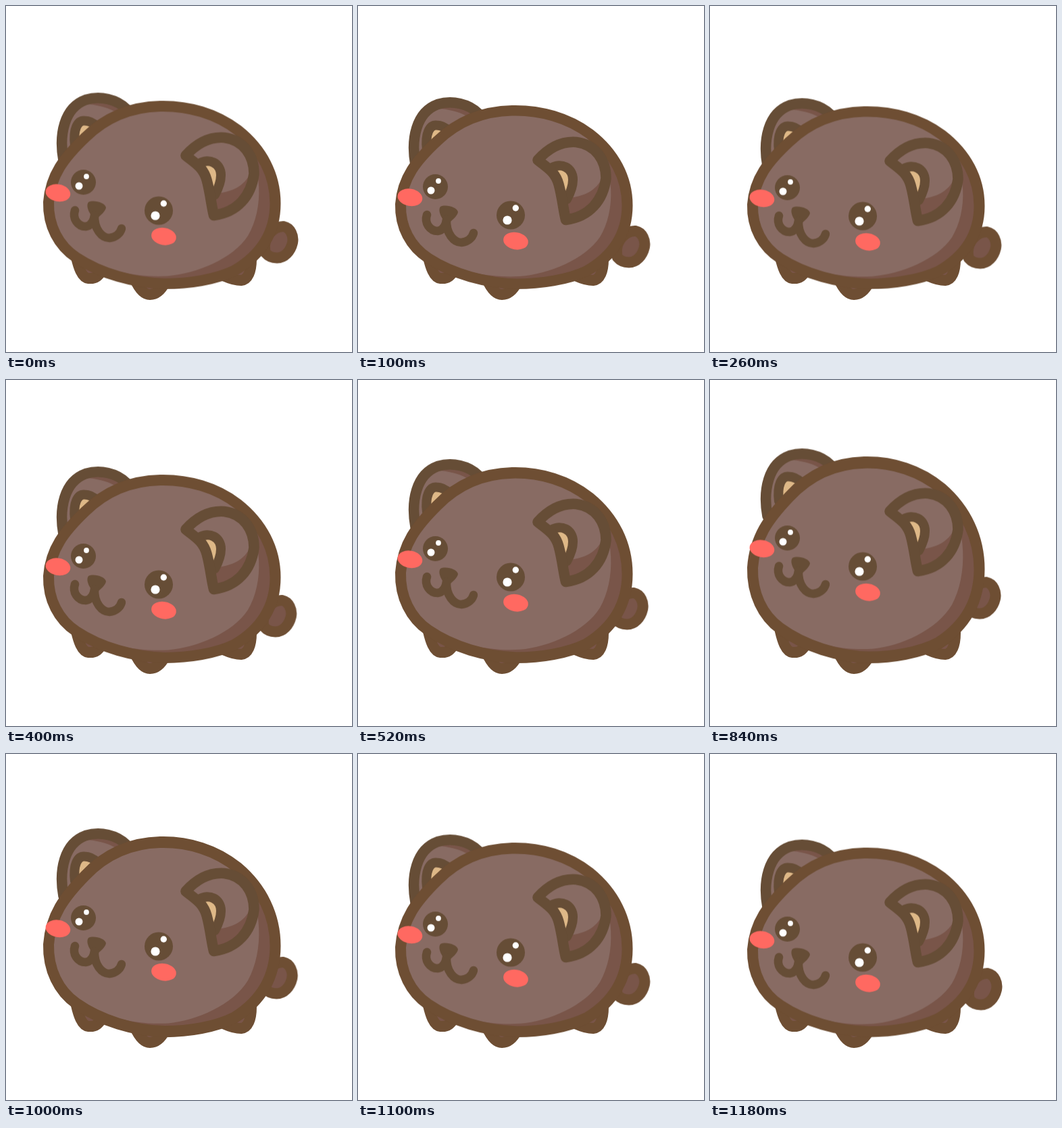
An HTML page that plays this animation: 512x512 px, repeating every 1200 ms.

```html
<!DOCTYPE html>
<html lang="en">
<head>
<meta charset="utf-8">
<title>Breathing bear</title>
<style>
  html, body { margin: 0; width: 100%; height: 100%; overflow: hidden; background: #fff; }
  svg { display: block; width: 100vw; height: 100vh; }

  .line { stroke: #6e4e33; stroke-width: 16; }
  .dark { stroke: #664d36; stroke-width: 15.5; }
  .line, .dark { stroke-linecap: round; stroke-linejoin: round; }
  .open { fill: none; }
  .light { fill: #886b63; }
  .shade { fill: #795549; }
  .tan { fill: #deb887; }
  .eye { fill: #664d36; }
  .glint { fill: #fff; }
  .cheek { fill: #ff6961; }
  .inner { stroke-width: 14; }
  .mouth { stroke-width: 12.5; }

  /* Half a breath each way, eased as a sine */
  .bob, .squash, .sway {
    animation: 600ms cubic-bezier(.364, 0, .636, 1) -400ms infinite alternate;
  }
  .bob { animation-name: bob; }
  .squash { animation-name: squash; transform-origin: 0 417px; }
  .sway { animation-name: sway; animation-delay: 0ms; }

  @keyframes bob {
    from { transform: translateY(-27.1px); }
    to { transform: translateY(9.3px); }
  }
  @keyframes squash {
    from { transform: scaleY(1.098); }
    to { transform: scaleY(.9665); }
  }
  @keyframes sway {
    from { transform: translateX(0); }
    to { transform: translateX(-3px); }
  }
</style>
</head>
<body>
<svg viewBox="0 0 512 512">
  <defs>
    <path id="body" d="M228 148C270 147 311 159 343 183.500C379 212 398.500 250 398.500 292C398.500 335 378 368 338 391.500C310 405 270 411 235 411C190 410 140 396 104 372C78 355 62 325 63 290C66 250 86 224 117.500 194C147 165 185 149 228 148Z"/>
    <path id="far-ear" d="M85 228C78 190 86 150 118 138.500C140 132 164 138 178 152"/>
    <path id="near-ear" d="M266 221C284 201 303 193 323 194.500C352 198 367 222 367 248C363 280 343 305 307.500 309.500C304 296 302 275 297 257C292 238 278 231 266 221Z"/>
  </defs>

  <!-- tail -->
  <g class="bob"><g class="sway">
    <path class="line shade" d="M384 365C378 340 398 325 411 326C421 328 426 340 424 350C421 363 412 372.500 401 372.500C395 372.500 389 371 384 365Z"/>
  </g></g>

  <!-- far ear -->
  <g class="bob">
    <use href="#far-ear" class="light"/>
    <path class="light" d="M85 228L178 152L150 200Z"/>
    <path class="shade" d="M122 145C140 147 154 151 166 159L178 154L150 138Z"/>
    <path class="dark tan inner" d="M102 206C99 182 106 169 116 169.500C124 169.500 130 173 136 179"/>
    <use href="#far-ear" class="dark open"/>
  </g>

  <!-- feet -->
  <g class="line shade">
    <path d="M104 372C107 385 112 402 122 403C133 404 138 399 144 388Z"/>
    <path d="M190 403C197 419 204 427 213 427C223 427 230 420 236 408Z"/>
    <path d="M324 400C335 405 342 406 348 406C358 405 363 393 363 374Z"/>
  </g>

  <!-- body -->
  <g class="squash">
    <use href="#body" class="shade"/>
    <path class="light" d="M228 153C285 152 328 168 350 194C380 235 382 300 358 340C336 374 282 396 240 399.500C200 402 150 394 112 371C86 354 67 322 68 290C72 254 90 226 120 196C150 168 187 153 228 153Z"/>
    <use href="#body" class="line open"/>
  </g>

  <g class="bob">
    <!-- near ear -->
    <use href="#near-ear" class="light"/>
    <path class="shade" d="M304 278C330 276 350 269 360 250L367 248C363 280 343 305 308 309Z"/>
    <path class="dark tan inner" d="M286 233C300 224 318 232 318 250C318 260 314 270 309 279"/>
    <use href="#near-ear" class="dark open"/>

    <!-- face -->
    <circle class="eye" cx="114.500" cy="260.500" r="18.500"/>
    <circle class="glint" cx="108" cy="266" r="5.500"/>
    <circle class="glint" cx="119" cy="252" r="3.900"/>
    <circle class="eye" cx="226" cy="302.500" r="21"/>
    <circle class="glint" cx="221" cy="310" r="6.600"/>
    <circle class="glint" cx="233.300" cy="292" r="4.700"/>
    <ellipse class="cheek" cx="77" cy="276.300" rx="18.500" ry="12.700" transform="rotate(10 77 276)"/>
    <ellipse class="cheek" cx="233.500" cy="340.700" rx="18.500" ry="12.700" transform="rotate(10 233.500 340.500)"/>
    <path class="eye" d="M122 290C130 286 147 291 148 298C147 304 140 309 133 316C125 311 117 296 122 290Z"/>
    <path class="dark open mouth" d="M102 302C98 314 106 326 118 326C126 325 130 318 131 309C130 330 142 343 153 343C163 342 169 336 171 329"/>
  </g>
</svg>
</body>
</html>
```
